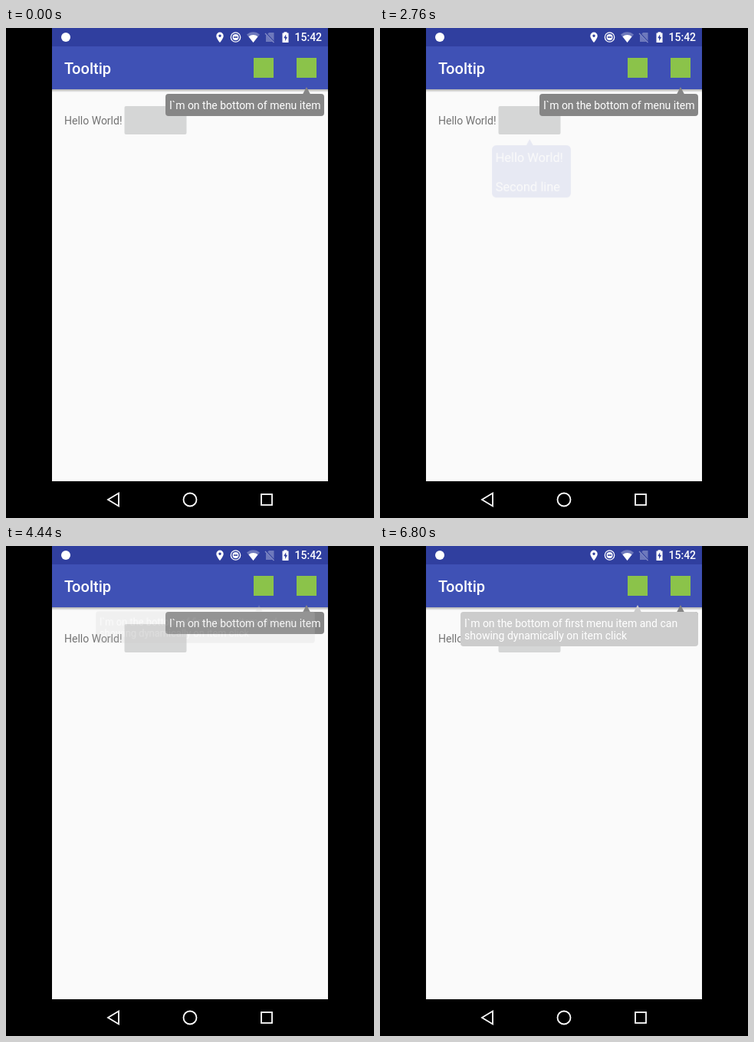
An HTML page that plays this animation: 480 px wide and 640 px high, repeating every 6840 ms.

```html
<!DOCTYPE html>
<html lang="en">
<head>
<meta charset="utf-8">
<title>Tooltip</title>
<style>
  html, body { margin: 0; width: 100%; height: 100%; overflow: hidden; background: #000; }
  svg { display: block; width: 480px; height: 640px; font: 14px Roboto, sans-serif; }
  .light { fill: #fff; }
  .line { fill: none; stroke: #fff; stroke-width: 1.8; }

  /* One loop is 6840 ms. Tooltips fade and grow for 300 ms with a cubic ease-out. */
  .anim { animation: 6840ms linear infinite; }
  .popup { animation-timing-function: cubic-bezier(.3333, 1, .6667, 1); }
  .hello { animation-name: hello; transform-origin: 197.5px 145px; }
  .first { animation-name: first; transform-origin: 260px 77px; }
  .press { animation-name: press; transform-origin: 189px 120px; }
  .tap { animation-name: tap; transform-origin: 336px 52px; }

  @keyframes hello {
    0%, 19.971%, 42.398%, 73.772%, 93.275%, 100% { opacity: 0; transform: scale(.9); }
    24.357%, 38.012%, 78.158%, 88.889% { opacity: 1; transform: scale(1); }
  }
  @keyframes first {
    0%, 49.211%, 67.544%, 91.316% { opacity: 0; transform: scale(.9); }
    53.597%, 63.158%, 95.702%, 100% { opacity: 1; transform: scale(1); }
  }
  @keyframes press {
    0%, 18.129%, 71.93% { opacity: 0; transform: scale(.15); }
    20.468%, 74.269% { opacity: 1; transform: scale(.7); }
    23.5%, 77.3% { opacity: .8; transform: scale(1.1); }
    28.07%, 81.871%, 100% { opacity: 0; transform: scale(1.1); }
  }
  @keyframes tap {
    0%, 47.368%, 89.474% { opacity: 0; transform: scale(.2); }
    49.707%, 91.813% { opacity: 1; transform: scale(.75); }
    52.5%, 94.6% { opacity: .8; transform: scale(1); }
    57.31%, 99.415%, 100% { opacity: 0; transform: scale(1); }
  }
</style>
</head>
<body>
<svg viewBox="0 0 480 640">
  <defs>
    <linearGradient id="shade" x2="0" y2="1">
      <stop offset="0" stop-opacity=".3"/>
      <stop offset="1" stop-opacity="0"/>
    </linearGradient>
    <clipPath id="button"><rect x="154.500" y="102" width="81" height="37" rx="2"/></clipPath>
  </defs>

  <rect width="480" height="640"/>
  <rect x="60" y="80" width="360" height="512" fill="#fafafa"/>
  <rect x="60" y="80" width="360" height="4" fill="url(#shade)"/>
  <rect x="60" width="360" height="24" fill="#303f9f"/>
  <rect x="60" y="24" width="360" height="56" fill="#3f51b5"/>

  <!-- status bar -->
  <g class="light">
    <circle cx="78" cy="12" r="6"/>
    <path fill-rule="evenodd" d="M279 5.500a4.700 4.700 0 0 1 4.700 4.700c0 3.500-4.700 8.800-4.700 8.800s-4.700-5.300-4.700-8.800a4.700 4.700 0 0 1 4.700-4.700zm0 3a1.700 1.700 0 1 0 .01 0z"/>
    <circle cx="299.500" cy="12" r="4"/>
    <path d="M314 8.500a12.500 12.500 0 0 1 17 0l-8.500 10.500z" opacity=".3"/>
    <path d="M316.500 11.300a9 9 0 0 1 12 0l-6 7.700z"/>
    <path fill-rule="evenodd" d="M360.500 6.500h2v-1.200h4v1.200h2v12.500h-8zm4.700 1.700-3 5h1.900v3.800l3-5.300h-1.900z"/>
    <text x="376.500" y="17" font-weight="500">15:42</text>
  </g>
  <circle class="line" cx="299.500" cy="12" r="6.200" style="stroke-width: 1.3"/>
  <path d="M297 12h5" stroke="#303f9f" stroke-width="1.600"/>
  <path d="M343 6h6.500v12h-10.500v-8z" fill="#6e79bc"/>
  <path d="M338 6l12 13" stroke="#303f9f" stroke-width="2.400"/>
  <path d="M338 7l11.500 12" stroke="#8790c8" stroke-width="1.200"/>

  <!-- toolbar -->
  <text class="light" x="76" y="59.500" font-size="20" font-weight="500">Tooltip</text>
  <g fill="#8bc34a">
    <rect x="323" y="39" width="26" height="26"/>
    <rect x="379" y="39" width="26" height="26"/>
  </g>
  <circle class="anim tap" cx="336" cy="52" r="22" fill="#fff" fill-opacity=".18"/>

  <!-- page -->
  <text x="76" y="125.500" fill="#737373">Hello World!</text>
  <rect x="154.500" y="102" width="81" height="37" rx="2" fill="#d5d6d6"/>
  <g clip-path="url(#button)">
    <circle class="anim press" cx="189" cy="120" r="48" fill-opacity=".1"/>
  </g>

  <!-- tooltips -->
  <path d="M387 86.500l5-9.500 5 9.500zM212 86h199a4 4 0 0 1 4 4v21a4 4 0 0 1-4 4h-199a4 4 0 0 1-4-4v-21a4 4 0 0 1 4-4z" fill="#868686"/>
  <text class="light" x="213" y="106">I`m on the bottom of menu item</text>

  <g class="anim popup first">
    <path d="M331 86.500l5-9.500 5 9.500zM109 86h302a4 4 0 0 1 4 4v37a4 4 0 0 1-4 4h-302a4 4 0 0 1-4-4v-37a4 4 0 0 1 4-4z" fill="#ccc"/>
    <g class="light">
      <text x="110" y="106">I`m on the bottom of first menu item and can</text>
      <text x="110" y="122">showing dynamically on item click</text>
    </g>
  </g>

  <g class="anim popup hello">
    <path d="M190 154.500l5-9.500 5 9.500zM147 154h101a6 6 0 0 1 6 6v63a6 6 0 0 1-6 6h-101a6 6 0 0 1-6-6v-63a6 6 0 0 1 6-6z" fill="#3f51b5"/>
    <g class="light" font-size="18">
      <text x="146" y="178">Hello World!</text>
      <text x="146" y="219.500">Second line</text>
    </g>
  </g>

  <!-- navigation bar -->
  <g class="line">
    <path d="M147 607.500v17l-14-8.500z"/>
    <circle cx="240" cy="616" r="8.500"/>
    <rect x="333" y="609" width="14" height="14"/>
  </g>
</svg>
</body>
</html>
```
